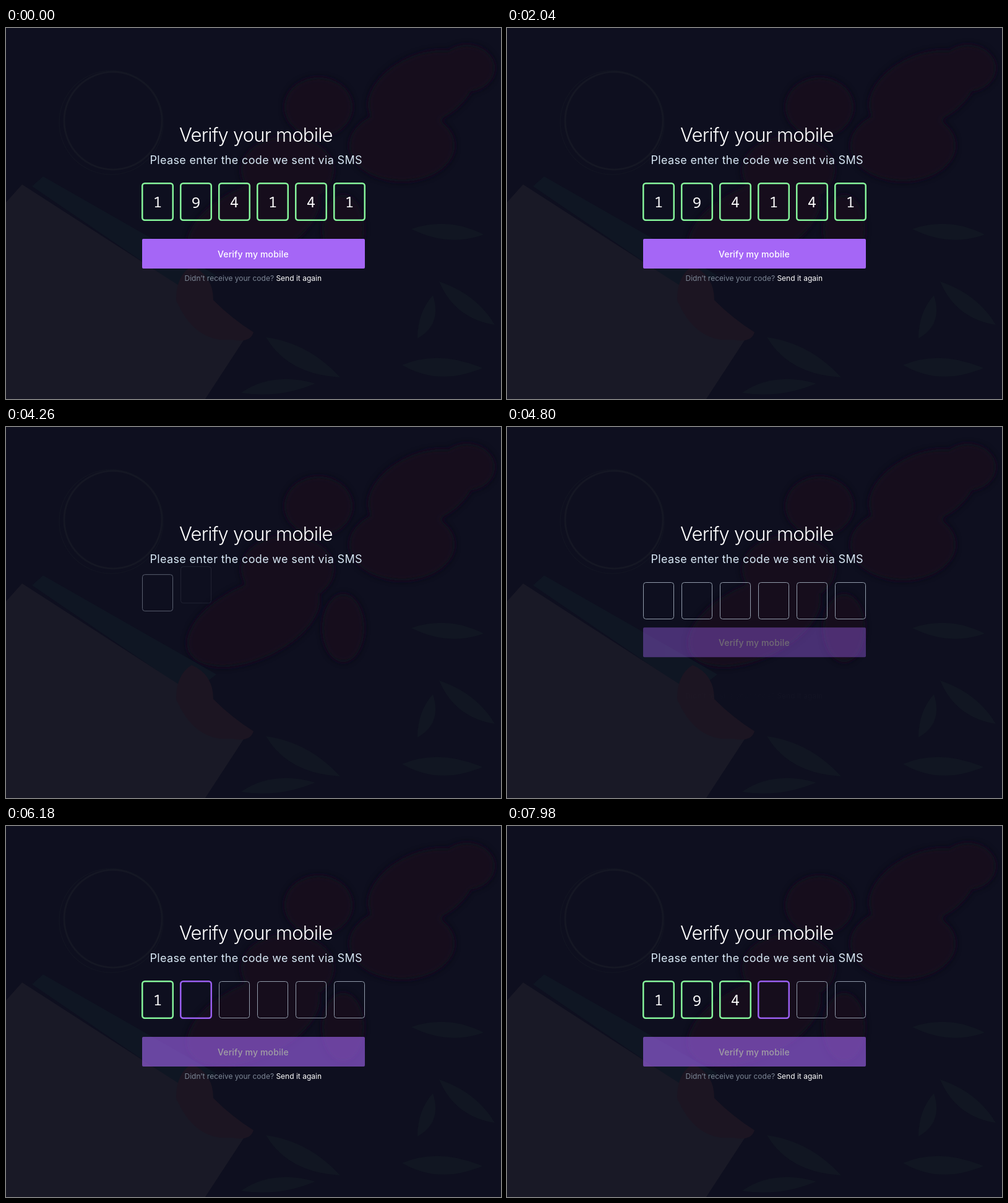
Write an HTML page that moves like this. It is 800 px wide and 600 px high and loops after 8000 ms.

```html
<!DOCTYPE html>
<html lang="en">
<head>
<meta charset="utf-8">
<title>Verify your mobile</title>
<style>
  html, body { margin: 0; width: 100%; height: 100%; overflow: hidden; background: #0e0f1f; }
  svg { display: block; width: 800px; height: 600px; font-family: Inter, "Open Sans", sans-serif; fill: #fff; }
  .title { font-size: 31px; font-weight: 300; letter-spacing: -.8px; }
  .lead { font-size: 18px; letter-spacing: .33px; fill: #d8e8f5; }
  .label { font-size: 14px; font-weight: 500; letter-spacing: .15px; }
  .note { font-size: 12px; }
  .muted { fill: #7d8796; }
  .digit { font: 300 24px "Noto Sans Mono", "DejaVu Sans Mono", monospace; text-anchor: middle; }
  .box, .ring { fill: none; }
  .box { stroke: #929cab; }
  .ring { stroke-width: 2.5; }
</style>
</head>
<body>
<svg viewBox="0 0 800 600">
  <defs>
    <filter id="soft" x="-20%" y="-20%" width="140%" height="140%"><feGaussianBlur stdDeviation="5"/></filter>
  </defs>
  <rect width="800" height="600" fill="#0e0f1f"/>
  <g filter="url(#soft)" fill="#17101f">
    <ellipse cx="505" cy="128" rx="55" ry="48"/>
    <ellipse cx="672" cy="100" rx="92" ry="56" transform="rotate(-25 672 100)"/>
    <ellipse cx="640" cy="190" rx="85" ry="58"/>
    <ellipse cx="455" cy="230" rx="75" ry="55"/>
    <ellipse cx="400" cy="315" rx="115" ry="60" transform="rotate(-25 400 315)"/>
    <ellipse cx="545" cy="325" rx="34" ry="55"/>
    <ellipse cx="745" cy="65" rx="45" ry="38"/>
  </g>
  <path d="M60 240 340 400 300 432 42 256Z" fill="#0f1623"/>
  <path d="M26 253 285 420 384 505 322 600H0V282Z" fill="#191926"/>
  <path d="M300 385Q335 400 335 440 365 470 400 492 395 510 365 504 305 510 275 440Q275 400 300 385Z" fill="#1c1522"/>
  <g fill="#111622">
    <path d="M655 325Q715 305 772 334 715 355 655 325Z"/>
    <path d="M700 410Q760 430 790 480 725 470 700 410Z"/>
    <path d="M690 432Q705 480 665 502 665 460 690 432Z"/>
    <path d="M420 500Q490 510 540 565 455 560 420 500Z"/>
    <path d="M380 590Q430 555 500 575 440 600 380 590Z"/>
    <path d="M640 545Q700 520 770 550 700 580 640 545Z"/>
  </g>
  <g fill="none" stroke="#151724">
    <circle cx="173" cy="150" r="79" stroke-width="3"/>
    <circle cx="170" cy="153" r="84" stroke-width="1.5" opacity=".7"/>
  </g>

  <g id="ui">
    <text id="title" class="title" x="280" y="184">Verify your mobile</text>
    <text id="lead" class="lead" x="232.5" y="220">Please enter the code we sent via SMS</text>
    <g id="boxes"></g>
    <rect id="focus" class="ring" x="220.25" y="251.25" width="49.5" height="59.5" rx="4" stroke="#9a5ff0"/>
    <g id="button">
      <rect x="220" y="341" width="360" height="48" rx="2" fill="#a566f6"/>
      <text class="label" x="342" y="371">Verify my mobile</text>
    </g>
    <text id="note" class="note" x="288.5" y="409"><tspan class="muted">Didn’t receive your code?</tspan> Send it again</text>
  </g>
</svg>
<script>
const LOOP = 8000, BLANK = 3220, PITCH = 62;
const TYPED = [5840, 6640, 7440];   // moments at which digits are entered
const FOCUS = 5400;

const el = id => document.getElementById(id);
const clamp = v => Math.min(1, Math.max(0, v));

// CSS-like cubic-bezier(x1, y1, x2, y2)
const bezier = (x1, y1, x2, y2) => v => {
  const at = (a, b, s) => 3 * a * s * (1 - s) ** 2 + 3 * b * s * s * (1 - s) + s ** 3;
  let lo = 0, hi = 1;
  for (let i = 0; i < 20; i++) {
    const mid = (lo + hi) / 2;
    if (at(x1, x2, mid) < v) lo = mid; else hi = mid;
  }
  return at(y1, y2, lo);
};
const ease = bezier(.25, .1, .25, 1);
const easeInOut = bezier(.42, 0, .58, 1);
const ramp = (t, start, length, curve = ease) => {
  const v = clamp((t - start) / length);
  return v === 0 || v === 1 ? v : curve(v);
};

el("boxes").innerHTML = [..."194141"].map((d, i) => `
  <g>
    <rect class="box" x="${220.5 + i * PITCH}" y="251.5" width="49" height="59" rx="4"/>
    <g>
      <rect class="ring" x="${220.25 + i * PITCH}" y="251.25" width="49.5" height="59.5" rx="4" stroke="#86f59b"/>
      <text class="digit" x="${245 + i * PITCH}" y="${d === "9" ? 291 : 290}">${d}</text>
    </g>
  </g>`).join("");
const boxes = [...el("boxes").children];

function place(node, opacity, dx = 0, dy = 0) {
  node.setAttribute("opacity", opacity);
  node.setAttribute("transform", `translate(${dx} ${dy})`);
}

function draw(t) {
  const done = t < BLANK;
  const shown = (...args) => done ? 1 : ramp(t, ...args);

  place(el("ui"), done ? 1 - ramp(t, 2920, 300) : 1);
  place(el("title"), shown(3940, 260));
  place(el("lead"), shown(3980, 260));

  boxes.forEach((box, i) => {
    const p = shown(4155 + i * 65, 320);
    place(box, p, 0, -30 * (1 - p));
    place(box.lastElementChild, done ? 1 : i < TYPED.length ? ramp(t, TYPED[i], 200) : 0);
  });

  const steps = TYPED.reduce((sum, start) => sum + ramp(t, start, 300), 0);
  place(el("focus"), done ? 0 : ramp(t, FOCUS, 200), steps * PITCH);

  const drop = shown(4614, 400, easeInOut);
  const fade = done ? 1 : .6 * clamp((t - 4620) / 280);
  place(el("button"), fade, 0, -30 * (1 - drop));

  const rise = shown(4790, 400);
  place(el("note"), rise, 0, 30 * (1 - rise));
}

const begin = performance.now();
function frame() {
  draw((performance.now() - begin) % LOOP);
  requestAnimationFrame(frame);
}
draw(0);
requestAnimationFrame(frame);
</script>
</body>
</html>
```
